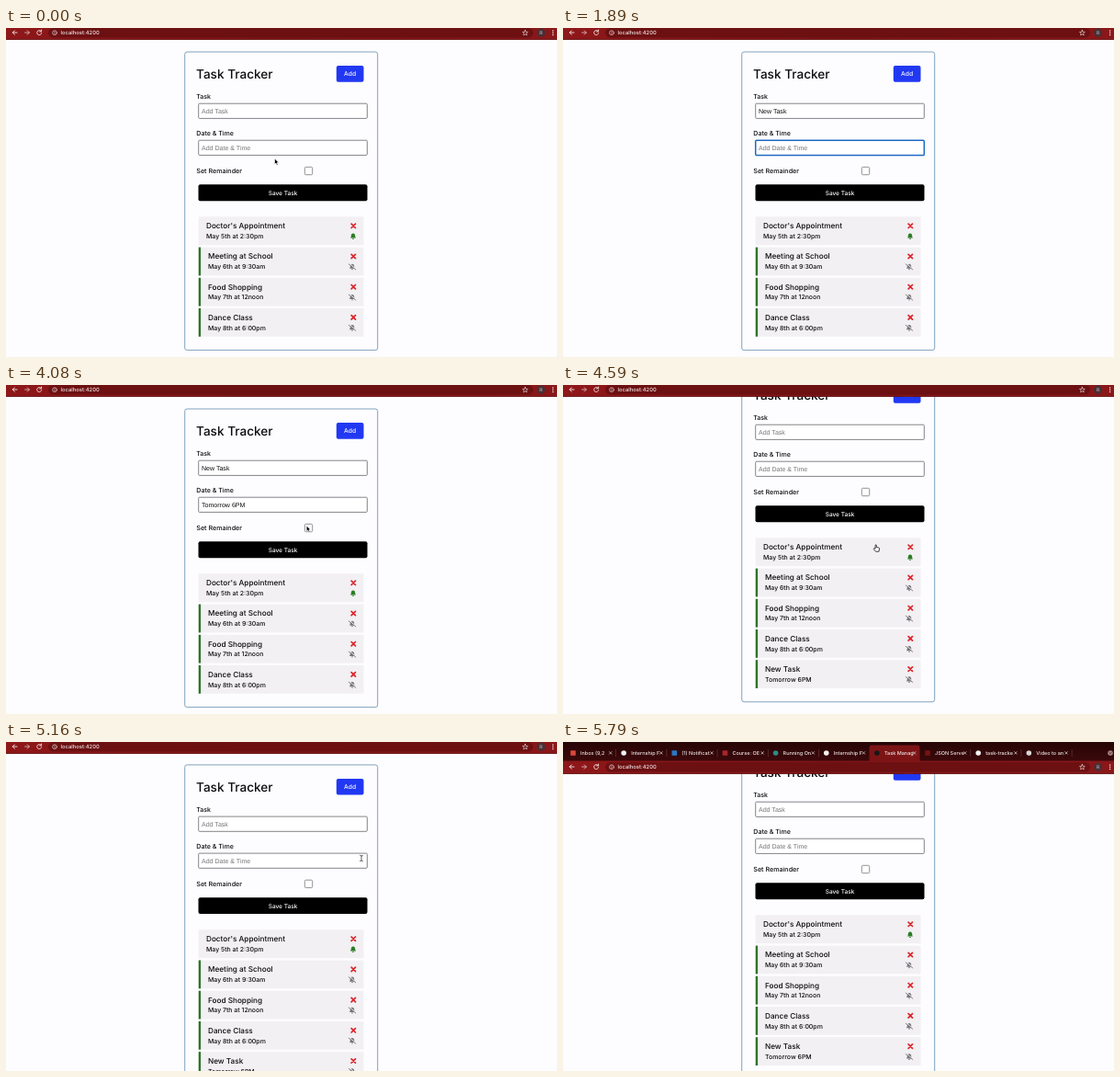
Recreate the animation shown at these times as an HTML page. Size 600 by 358 pixels, loop 5.82 s.

```html
<!DOCTYPE html>
<html lang="en">
<head>
<meta charset="utf-8">
<title>Task Tracker</title>
<style>
  html, body { margin: 0; width: 100%; height: 100%; overflow: hidden; background: #fdfcfe; }
  svg { display: block; width: 100%; height: 100%; }
  text { font-family: Inter, Roboto, sans-serif; font-weight: 450; text-rendering: geometricPrecision; white-space: pre; }
  .field text { font: 7.05px "Liberation Sans", Arial, sans-serif; }
  .line { fill: none; stroke-linecap: round; stroke-linejoin: round; }
</style>
</head>
<body>
<svg id="stage" viewBox="0 0 600 358">
  <defs>
    <linearGradient id="red" x1="0" x2="1">
      <stop offset="0" stop-color="#8e1719"/><stop offset=".5" stop-color="#7c1416"/><stop offset="1" stop-color="#8a1719"/>
    </linearGradient>
    <linearGradient id="strip" x1="0" x2="0" y1="0" y2="1">
      <stop offset="0" stop-color="#260506"/><stop offset="1" stop-color="#3d090b"/>
    </linearGradient>
  </defs>
  <rect width="600" height="358" fill="#fdfcfe"/>
  <g id="page"></g>
  <g id="bar"></g>
  <g id="cursor"></g>
</svg>
<script>
const LOOP = 5820, STEP = 30, MAX_SCROLL = 39, BAR_DROP = 22, PITCH = 33.2;
const $ = id => document.getElementById(id);

function el(parent, tag, attrs = {}, text = "") {
  const node = document.createElementNS("http://www.w3.org/2000/svg", tag);
  set(node, attrs);
  node.textContent = text;
  return parent.appendChild(node);
}
function set(node, attrs) {
  for (const k in attrs) node.setAttribute(k, attrs[k]);
}
const rect = (p, x, y, width, height, fill, more) => el(p, "rect", { x, y, width, height, fill, ...more });
const label = (p, x, y, size, text, fill = "#0c0c0e", more) =>
  el(p, "text", { x, y, "font-size": size, fill, ...more }, text);
const line = (p, d, stroke, width, more) =>
  el(p, "path", { d, class: "line", stroke, "stroke-width": width, ...more });
const show = (node, on) => set(node, { visibility: on ? "visible" : "hidden" });

// ---- page ----
const page = $("page");
const card = rect(page, 194.7, 26, 210, 324.6, "none", { rx: 2.5, stroke: "#7fa3c0", "stroke-width": 1 });
label(page, 207, 55, 13.6, "Task Tracker", "#0c0c0e", { "font-weight": 500 });
rect(page, 359.8, 41, 29.7, 17.7, "#2138f3", { rx: 2 });
label(page, 374.6, 52.3, 6.7, "Add", "#fff", { "text-anchor": "middle" });
label(page, 207.3, 77, 7, "Task");
label(page, 207.3, 117, 7.05, "Date & Time");
label(page, 207.3, 158, 7.15, "Set Remainder");

function field(y, hint) {
  const g = el(page, "g", { class: "field" });
  const box = rect(g, 209.7, y, 183.6, 16.2, "#fff", { rx: 1 });
  const text = label(g, 213, y + 10.4, 7, "");
  const caret = rect(g, 0, y + 4.2, 0.6, 8, "#111");
  return (value, focused, caretOn) => {
    text.textContent = value || hint;
    set(text, { fill: value ? "#0b0b0b" : "#757575" });
    set(box, { stroke: focused ? "#1f69c4" : "#77777b", "stroke-width": focused ? 1.5 : 0.9 });
    show(caret, focused && caretOn);
    if (focused) set(caret, { x: 213.2 + (value ? text.getComputedTextLength() : 0) });
  };
}
const taskField = field(82.2, "Add Task");
const dateField = field(122.2, "Add Date & Time");

const check = rect(page, 325.3, 151.3, 8.4, 8.4, "#fff", { rx: 1.3, "stroke-width": 0.8 });
const tick = line(page, "M327.3 155.7l1.6 1.7 3-3.8", "#fff", 1.2);
rect(page, 209.5, 170.3, 184, 17.9, "#000", { rx: 2 });
label(page, 301.5, 181.8, 6.5, "Save Task", "#fff", { "text-anchor": "middle" });

const BELL = "M0-3.2C-1.8-3-2.2-1.8-2.2-.5-2.2.8-2.7 1.3-3.1 1.9H3.1C2.7 1.3 2.2.8 2.2-.5 2.2-1.8 1.8-3 0-3.2ZM-1 2.4A1 1 0 0 0 1 2.4Z";
function item(i, title, when, marked) {
  const g = el(page, "g", { transform: `translate(0 ${205.4 + i * PITCH})` });
  rect(g, 209.7, 0, 179.8, 30.8, "#f2f0f3");
  if (marked) rect(g, 209.7, 0, 2.4, 30.8, "#2f7428");
  const x = marked ? 220 : 218;
  label(g, x, 12.8, 8.2, title);
  label(g, x, 23.7, 6.95, when);
  line(g, "M376.1 7.7l4.4 4.4m0-4.4l-4.4 4.4", "#dc2429", 1.7);
  const bell = el(g, "g", { transform: `translate(${marked ? 377 : 378} 21.3)` });
  el(bell, "path", { d: BELL, fill: marked ? "#77757a" : "#2c7d25" });
  if (marked) {
    line(bell, "M-3.2-3.4L4 2.6", "#f2f0f3", 1.1);
    line(bell, "M-3.8-3L3.8 3", "#69676c", 0.8);
  }
  return g;
}
const extra = [
  ["Doctor's Appointment", "May 5th at 2:30pm"],
  ["Meeting at School", "May 6th at 9:30am"],
  ["Food Shopping", "May 7th at 12noon"],
  ["Dance Class", "May 8th at 6:00pm"],
  ["New Task", "Tomorrow 6PM"]
].map(([title, when], i) => item(i, title, when, i > 0)).pop();

// ---- browser bar ----
const bar = $("bar");
rect(bar, 0, -22, 600, 22, "url(#strip)");
rect(bar, 333.5, -18.5, 55, 20, "#7c1416", { rx: 3 });
rect(bar, 0, -1.5, 600, 14.2, "url(#red)");
rect(bar, 0, 12.2, 600, 0.7, "#5a0c0e");
rect(bar, 46, 0, 528, 10.6, "#6c1012", { rx: 5.3 });
const WHITE = "#f4e9e9";
line(bar, "M12 5H7.2m2.2-2.2L7.2 5l2.2 2.2", WHITE, 0.9);
line(bar, "M20.6 5h4.8m-2.2-2.2L25.4 5l-2.2 2.2", "#d5b4b5", 0.9);
line(bar, "M38.1 3.4A2.5 2.5 0 1 0 38.7 5.6M38.6 2v1.9h-1.9", WHITE, 0.9);
el(bar, "circle", { cx: 53, cy: 5.2, r: 2.4, class: "line", stroke: WHITE, "stroke-width": 0.6 });
line(bar, "M53 5v1.3m0-2.4v.1", WHITE, 0.6);
label(bar, 59.6, 7.3, 5.85, "localhost:4200", WHITE, { "font-weight": 400 });
line(bar, "M565.4 2.3l.8 2 2.1.1-1.6 1.4.5 2.1-1.8-1.1-1.8 1.1.5-2.1-1.6-1.4 2.1-.1z", WHITE, 0.6);
el(bar, "circle", { cx: 582.6, cy: 5.2, r: 4.6, fill: "#4a3036" });
label(bar, 582.6, 7.1, 5, "R", "#c5b6b8", { "text-anchor": "middle" });
for (const y of [2.9, 5.2, 7.5]) el(bar, "circle", { cx: 595.6, cy: y, r: 0.75, fill: WHITE });

[
  ["Inbox (9,2", "#d9483b"], ["Internship F", "#f2f2f2", 1], ["(1) Notificat", "#2a78c5"],
  ["Course: OE", "#a8242d"], ["Running On", "#2f8a86", 1], ["Internship F", "#f2f2f2", 1],
  ["Task Manag", "#171717", 1], ["JSON Serve", "#7a1214"], ["task-tracke", "#f2f2f2", 1],
  ["Video to an", "#d8d8d8", 1]
].forEach(([name, color, round], i) => {
  const x = 11 + i * 55.15;
  rect(bar, x - 2.8, -12.8, 5.6, 5.6, color, { rx: round ? 2.8 : 0.6 });
  label(bar, x + 8, -7.9, 5.5, name, "#eee3e3", { "font-weight": 400 });
  line(bar, `M${x + 39.4}-11.4l2.6 2.6m0-2.6l-2.6 2.6`, "#eadada", 0.7);
  if (i < 5 || i > 6) rect(bar, x + 46.5, -14, 0.5, 8, "#7b4a4b");
});
el(bar, "circle", { cx: 596, cy: -10, r: 2.8, fill: "#a78384" });
line(bar, "M594.8-10.5l1.2 1.2 1.2-1.2", "#2c0607", 0.7);

// ---- pointers ----
const pointer = $("cursor");
const shapes = { arrow: el(pointer, "g"), beam: el(pointer, "g"), hand: el(pointer, "g") };
el(shapes.arrow, "path", { d: "M0 0V6.3L1.5 5 2.5 7.2 3.6 6.7 2.6 4.6H4.5Z", fill: "#000", stroke: "#fff", "stroke-width": 0.6 });
line(shapes.beam, "M-1.4-3.2Q0-3.2 0-2.2V2.2Q0 3.2-1.4 3.2M1.4-3.2Q0-3.2 0-2.2M0 2.2Q0 3.2 1.4 3.2", "#222", 0.7);
el(shapes.hand, "path", {
  d: "M-1.4.7V-3Q-1.4-3.7-.8-3.7-.2-3.7-.2-3V-1L2.3-.5Q3.1-.2 3.1.6L2.5 3.7H-1L-3.2 1Q-3.2 0-2.4.1Z",
  fill: "#fff", stroke: "#111", "stroke-width": 0.8, "stroke-linejoin": "round"
});

// ---- motion ----
// time, x, y, pointer shown until the next row
const path = [
  [0, 292.5, 142, "arrow"], [30, 286, 134, "arrow"], [450, 286, 134, "arrow"],
  [510, 285, 122, "beam"], [590, 284, 108, "arrow"], [640, 283, 97, "beam"],
  [720, 283, 91, "beam"], [990, 283, 91, ""],
  [3390, 283, 91, "beam"], [3520, 288, 101, "arrow"], [3620, 298, 121, "beam"],
  [3760, 314, 140, "arrow"], [3960, 327.2, 153, "arrow"], [4140, 327.2, 153, "arrow"],
  [4230, 335, 170, "hand"], [4320, 341.5, 177.5, "hand"], [4620, 341.5, 177.5, "arrow"],
  [4830, 372, 150, "arrow"], [4980, 387, 126.5, "beam"], [5250, 387, 126.5, "arrow"],
  [5520, 440, 3, "arrow"], [5640, 470, -12, ""]
];
const scrollKeys = [[0, 0], [4410, 0], [4560, MAX_SCROLL], [4680, MAX_SCROLL], [5010, 0], [5130, 0], [5430, MAX_SCROLL]];
const dropKeys = [[0, 0], [5520, 0], [5730, BAR_DROP]];
const FOCUS_TASK = 750, FOCUS_DATE = 1700, BLUR = 4050, CHECK = 4110, SAVE = 4350;

const ease = p => p * p * (3 - 2 * p);
function at(keys, t, col = 1, curve = ease) {
  let i = keys.length - 1;
  while (i && keys[i][0] > t) i--;
  const a = keys[i], b = keys[i + 1];
  if (!b) return a[col];
  return a[col] + (b[col] - a[col]) * curve((t - a[0]) / (b[0] - a[0]));
}

const runs = [
  { text: "New Task", from: 990, gap: 72 },
  { text: "Tomorrow", from: 2220, gap: 72 },
  { text: " 6PM", from: 2820, gap: 150 }
];
const typed = ({ text, from, gap }, t) =>
  t < from ? "" : text.slice(0, Math.floor((t - from) / gap) + 1);

function lastInput(t) {
  let last = t < FOCUS_DATE ? FOCUS_TASK : FOCUS_DATE;
  for (const { text, from, gap } of runs) {
    if (t >= from) last = Math.max(last, from + gap * Math.min(text.length - 1, Math.floor((t - from) / gap)));
  }
  return last;
}

function draw(t) {
  const saved = t >= SAVE;
  const caretOn = Math.floor((t - lastInput(t)) / 180) % 2 === 0;
  taskField(saved ? "" : typed(runs[0], t), t >= FOCUS_TASK && t < FOCUS_DATE, caretOn);
  dateField(saved ? "" : typed(runs[1], t) + typed(runs[2], t), t >= FOCUS_DATE && t < BLUR, caretOn);

  const checked = t >= CHECK && !saved;
  set(check, { fill: checked ? "#1672e8" : "#fff", stroke: checked ? "#1672e8" : "#767676" });
  show(tick, checked);
  show(extra, saved);
  set(card, { height: 324.6 + (saved ? PITCH : 0) });

  const drop = at(dropKeys, t);
  set(page, { transform: `translate(0 ${drop - at(scrollKeys, t)})` });
  set(bar, { transform: `translate(0 ${drop})` });

  const kind = path.filter(k => k[0] <= t).pop()[3];
  for (const name in shapes) show(shapes[name], name === kind);
  const linear = p => p;
  set(pointer, { transform: `translate(${at(path, t, 1, linear)} ${at(path, t, 2, linear)})` });
}

const start = performance.now();
function tickFrame() {
  const t = (performance.now() - start) % LOOP;
  draw(Math.floor(t / STEP) * STEP);
  requestAnimationFrame(tickFrame);
}
tickFrame();
</script>
</body>
</html>
```
